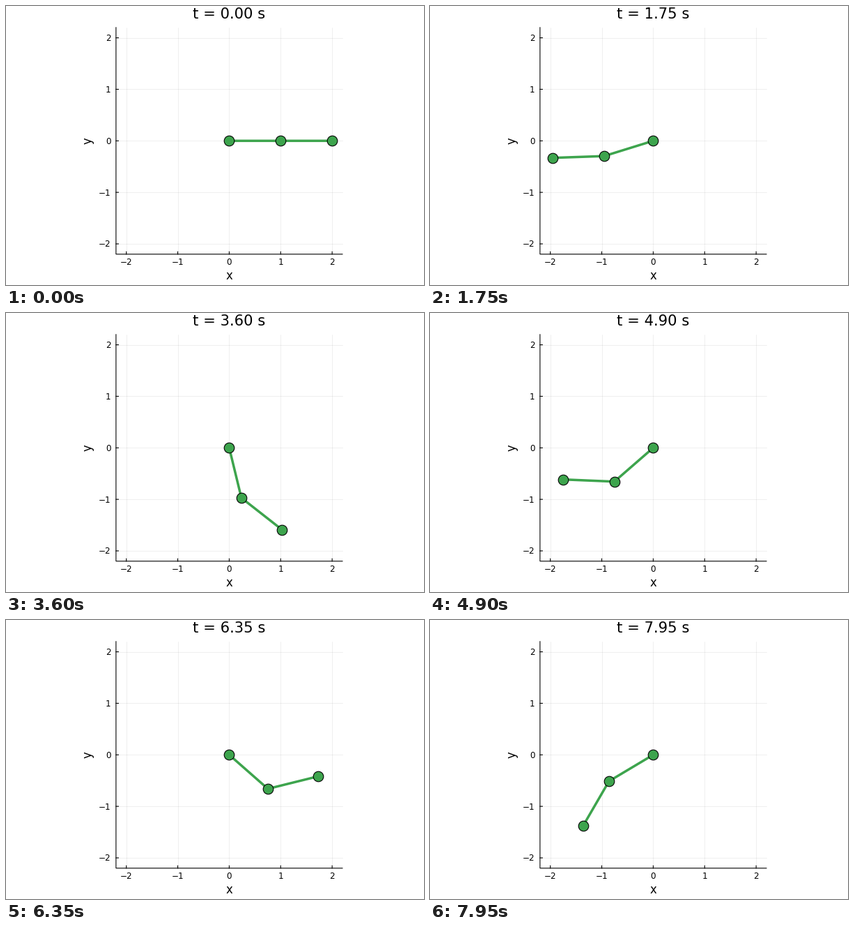
Animation of 600 by 400 pixels, one loop 8000 ms. Source, as a matplotlib script:

```python
import numpy as np
import matplotlib.pyplot as plt
from matplotlib.animation import FuncAnimation

W, H, DPI = 600, 400, 100
FRAMES, STEP_MS = 160, 50
X0, Y0, UNIT = 320.4, 193.3, 73.86      # pivot in pixels, pixels per metre
LEFT, RIGHT, TOP, BOTTOM = 157.9, 482.9, 30.8, 355.8
G = 9.81                                # unit masses on unit rods
SUBSTEPS = 40
GREEN = "#3da44d"


def pt(px):
    return px * 72 / DPI


def deriv(s):
    a, b, wa, wb = s
    d = a - b
    sd, cd = np.sin(d), np.cos(d)
    den = 2 - cd * cd
    fa = -wb * wb * sd - 2 * G * np.sin(a)
    fb = wa * wa * sd - G * np.sin(b)
    return np.array([wa, wb, (fa - cd * fb) / den, (2 * fb - cd * fa) / den])


def swing():
    """Angles of both rods at every frame, by Runge-Kutta."""
    s = np.array([np.pi / 2, np.pi / 2, 0.0, 0.0])
    h = STEP_MS / 1000 / SUBSTEPS
    out = []
    for _ in range(FRAMES):
        out.append(s[:2])
        for _ in range(SUBSTEPS):
            k1 = deriv(s)
            k2 = deriv(s + h / 2 * k1)
            k3 = deriv(s + h / 2 * k2)
            k4 = deriv(s + h * k3)
            s = s + h / 6 * (k1 + 2 * k2 + 2 * k3 + k4)
    return np.array(out)


angles = swing()

fig = plt.figure(figsize=(W / DPI, H / DPI), dpi=DPI, facecolor="white")
ax = fig.add_axes([0, 0, 1, 1])
ax.set_xlim(0, W)
ax.set_ylim(H, 0)
ax.axis("off")


def line(xs, ys, color, width, **kw):
    return ax.plot(xs, ys, color=color, lw=pt(width), **kw)[0]


def label(x, y, text, size, **kw):
    return ax.text(x, y, text, fontsize=pt(size), family="DejaVu Sans",
                   color="black", **kw)


for v in range(-2, 3):
    x, y = X0 + v * UNIT, Y0 - v * UNIT
    name = str(v).replace("-", "\u2212")
    line([x, x], [TOP, BOTTOM], "#000000", 0.6, alpha=0.1)
    line([LEFT, RIGHT], [y, y], "#000000", 0.6, alpha=0.1)
    line([x, x], [BOTTOM, BOTTOM - 3.5], "black", 1.1, snap=False)
    line([LEFT, LEFT + 3.5], [y, y], "black", 1.1, snap=False)
    label(x, 371.3, name, 12, ha="center", va="baseline")
    label(150.5, y + 4.4, name, 12, ha="right", va="baseline")

line([LEFT, LEFT, RIGHT], [TOP, BOTTOM, BOTTOM], "black", 1.1,
     snap=False, solid_joinstyle="miter")
label(X0, 392, "x", 16.5, ha="center", va="baseline")
label(118, Y0, "y", 16.5, ha="center", va="center", rotation=90)
title = label(X0, 18, "", 21.1, ha="center", va="baseline")

rods = line([], [], GREEN, 3.5, solid_capstyle="butt", snap=False)
balls = line([], [], GREEN, 0, ls="none", marker="o", markersize=pt(14.6),
             markeredgecolor="black", markeredgewidth=pt(1.1), snap=False)


def draw(i):
    a = angles[i]
    xs = X0 + UNIT * np.concatenate([[0], np.cumsum(np.sin(a))])
    ys = Y0 + UNIT * np.concatenate([[0], np.cumsum(np.cos(a))])
    rods.set_data(xs, ys)
    balls.set_data(xs, ys)
    title.set_text(f"t = {i * STEP_MS / 1000:.2f} s")
    return rods, balls, title


anim = FuncAnimation(fig, draw, frames=FRAMES, interval=STEP_MS,
                     repeat=True, repeat_delay=0)
plt.show()
```
